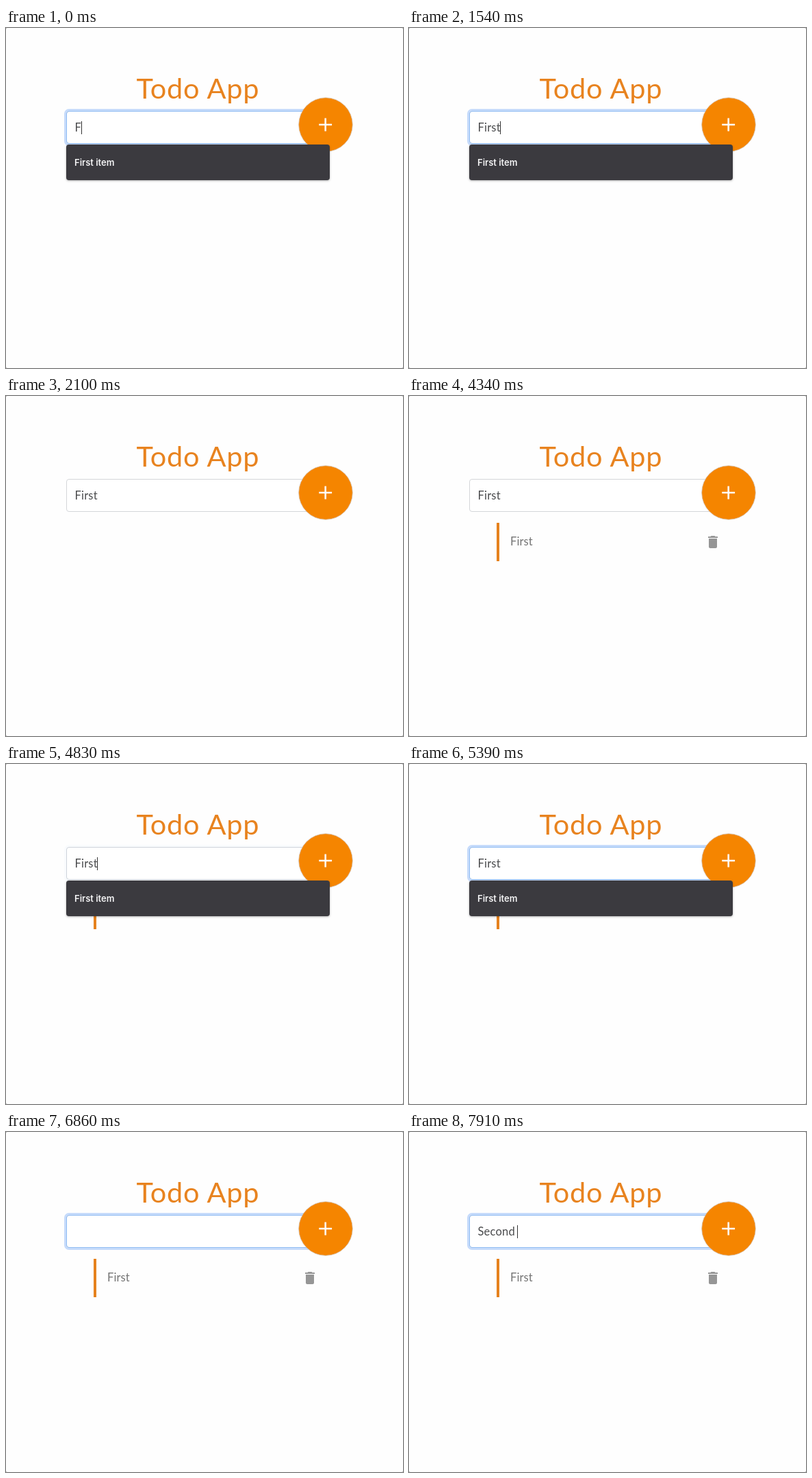
An HTML page that plays this animation: 580 px wide and 496 px high, repeating every 8 s.

```html
<!DOCTYPE html>
<html lang="en">
<head>
<meta charset="utf-8">
<title>Todo App</title>
<style>
  html, body { margin: 0; width: 100%; height: 100%; overflow: hidden; background: #a8a8a8; }
  svg { display: block; width: 580px; height: 496px; }
  text { font-family: Lato, "Open Sans", sans-serif; white-space: pre; }
  .title { font-size: 41.5px; letter-spacing: .8px; fill: #e8831f; }
  .entry { font-size: 16.5px; letter-spacing: .2px; fill: #4a4b4d; }
  .task { font-size: 16.5px; letter-spacing: .1px; fill: #747474; }
  .hint { font: 600 13px Inter, Roboto, sans-serif; fill: #f5f5f6; }
  #menu { filter: drop-shadow(0 1px 1.5px rgba(0, 0, 0, .3)); }
</style>
</head>
<body>
<svg viewBox="0 0 580 496">
  <rect width="580" height="496" rx="2" fill="#fefefe"/>
  <text class="title" x="190.5" y="103">Todo App</text>

  <g id="item">
    <rect x="128" y="185" width="4" height="56" fill="#e6821e"/>
    <text class="task" x="148" y="218">First</text>
    <path transform="translate(432 201)" fill="#969696"
      d="M6 19c0 1.1.9 2 2 2h8c1.1 0 2-.9 2-2V7H6zM19 4h-3.5l-1-1h-5l-1 1H5v2h14z"/>
  </g>

  <rect x="88.5" y="121.5" width="384" height="47" rx="3.5" fill="#fff" stroke="#d4d6d9"/>
  <g id="ring" fill="none">
    <rect x="86.5" y="119.5" width="388" height="51" rx="5.5" stroke="#c6dbfb" stroke-width="3"/>
    <rect x="88.5" y="121.5" width="384" height="47" rx="3.5" stroke="#8fbcf3"/>
  </g>
  <text id="entry" class="entry" x="100.5" y="151"></text>
  <rect id="caret" y="136" width="1" height="19" fill="#333"/>

  <circle cx="467" cy="141" r="39.3" fill="#f58500" stroke="#d3bfae" stroke-width=".8"/>
  <path d="M457.3 141h18.8M466.7 131.6v18.8" stroke="#fff" stroke-width="2.6"/>

  <g id="menu">
    <rect x="88" y="170" width="385" height="52" rx="4" fill="#3b3a3f"/>
    <text class="hint" x="100" y="201">First item</text>
  </g>
</svg>
<script>
const LOOP = 8000;

// Each track lists [start in ms, value]; values hold until the next step.
const tracks = {
  entry: [[0, "F"], [210, "Fi"], [350, "Fir"], [420, "Firs"], [490, "First"],
    [6230, "Firs"], [6440, "Fir"], [6510, "Fi"], [6580, ""],
    [7490, "S"], [7560, "Se"], [7700, "Seco"], [7840, "Secon"], [7910, "Second"]],
  caret: [[0, 1], [1050, 0], [1540, 1], [1610, 0], [4830, 1], [5320, 0],
    [5810, 1], [6510, 0], [6930, 1]],
  menu: [[0, 1], [1610, 0], [4830, 1], [6580, 0]],
  ring: [[0, 1], [1610, .7], [1680, .3], [1750, 0], [4830, .08], [4900, .6], [4970, 1]],
  item: [[0, 0], [3780, .5], [3850, 1]]
};

const caretX = {
  "": 101, F: 110, Fi: 114, Fir: 120, Firs: 128, First: 133,
  S: 111, Se: 120, Seco: 138, Secon: 148, Second: 158
};

const el = id => document.getElementById(id);
const valueAt = (track, t) => track.findLast(([start]) => start <= t)[1];

function draw(t) {
  for (const id of ["caret", "menu", "ring", "item"]) {
    el(id).setAttribute("opacity", valueAt(tracks[id], t));
  }
  const word = valueAt(tracks.entry, t);
  el("entry").textContent = word;
  el("caret").setAttribute("x", caretX[word]);
}

const begin = performance.now();
function tick() {
  draw((performance.now() - begin) % LOOP);
  requestAnimationFrame(tick);
}
tick();
</script>
</body>
</html>
```
